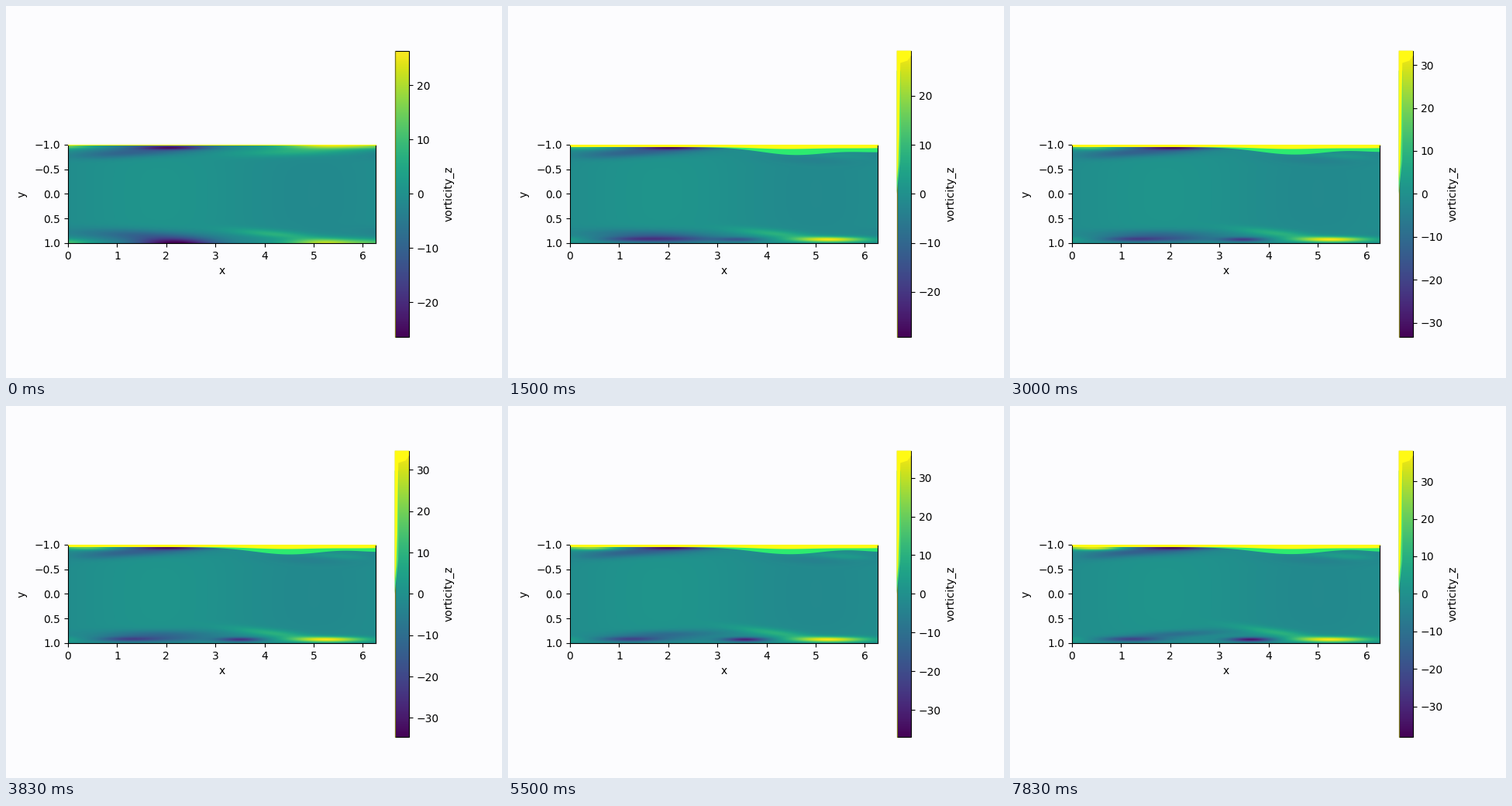
These frames come from a looping animation (640 px wide and 480 px high, 8 s). A matplotlib script:

```python
import numpy as np
import matplotlib.pyplot as plt
from matplotlib.animation import FuncAnimation
from matplotlib.patches import Polygon

FRAMES = 48
LOOP_MS = 8000
X_MAX = 2 * np.pi * 255 / 256
PX = X_MAX / 396.8          # data units per screen pixel
YELLOW = "#fffa14"
GREEN = "#2ceb70"

xs = np.linspace(0, X_MAX, 397)
X, Y = np.meshgrid(xs, np.linspace(-1, 1, 254))


def limit(i):
    """Colour limit: nearly flat at first, then growth that levels off."""
    return np.interp(i, [0, 5, 9, 14, 18, 23, 29, 38, 47],
                     [26.4, 26.8, 29.2, 31.85, 33.35, 35.0, 36.45, 37.7, 38.2])


def blob(cx, cy, sx, sy, tilt=0.0):
    """Periodic Gaussian streak, sheared by tilt."""
    dx = (X - cx + np.pi) % (2 * np.pi) - np.pi
    return np.exp(-(dx / sx) ** 2 - ((Y - cy - tilt * dx) / sy) ** 2)


def bump(cx, width):
    return np.exp(-((xs - cx) / width) ** 2)


def vorticity(i):
    """Vorticity divided by the colour limit."""
    s = i / (FRAMES - 1)
    start = np.exp(-i / 2.5)
    late = 1 - start
    grow = 1 - np.exp(-i / 18)

    w = 0.045 * np.sin(X - 0.3) * (1 - Y ** 4) - 0.01

    # lower wall
    w += start * (-0.95 * blob(2.2, 1.02, 0.8, 0.11, 0.02)
                  + 0.8 * blob(5.25, 1.0, 0.8, 0.09)
                  + 0.3 * blob(0.0, 1.0, 0.5, 0.08))
    w -= (0.36 - 0.08 * s) * blob(1.6 + 0.5 * s, 0.85 - 0.03 * s,
                                  1.35 - 0.35 * s, 0.12 - 0.05 * s,
                                  0.04 - 0.09 * s)
    w -= 0.75 * late * np.exp(-i / 16) * blob(1.9, 0.925, 1.0, 0.06)
    w -= grow * (0.55 * blob(1.2, 0.925, 0.6, 0.05)
                 + 0.95 * blob(3.4 + 0.25 * s, 0.93, 0.45, 0.045))
    w += 0.3 * blob(4.2, 0.82 - 0.03 * s, 0.85, 0.08, 0.08 + 0.06 * s)
    w += 0.95 * late * blob(5.3, 0.928, 0.75, 0.055)

    # upper wall
    w -= 0.75 * blob(2.1, -0.945, 0.75, 0.045)
    w -= 0.32 * blob(1.7, -0.88, 1.0, 0.1, -0.02)
    w -= 0.2 * blob(0.8, -0.8, 0.8, 0.09, -0.03 - 0.06 * s)
    w += 0.3 * blob(0.0, -0.97, 0.6, 0.05)
    w += 0.9 * s * blob(0.5, -0.935, 0.6, 0.045)
    w += start * (0.9 * blob(5.3, -1.0, 0.95, 0.075)
                  + 0.28 * blob(4.7, -0.87, 1.2, 0.09, -0.03))
    w += 0.17 * grow * blob(5.5, -0.77, 0.7, 0.06, 0.06)
    w -= 0.08 * late * blob(4.8, -0.7, 1.0, 0.1, 0.05)
    return np.clip(w, -1, 1)


def band(depth):
    """Outline of a strip hanging from the upper wall, depth in pixels."""
    low = np.column_stack([xs, -1 + depth * PX])
    return np.vstack([[0, -1], low, [X_MAX, -1]])


fig, ax = plt.subplots(figsize=(6.4, 4.8), dpi=100, facecolor="#fcfcfe")
im = ax.imshow(vorticity(0) * limit(0), cmap="viridis",
               extent=[0, X_MAX, 1, -1])
ax.set_xlabel("x")
ax.set_ylabel("y", labelpad=6.2)
ax.spines["top"].set_color(YELLOW)
im.set_clim(-limit(0), limit(0))
cbar = fig.colorbar(im, ax=ax, label="vorticity_z",
                    ticks=plt.MultipleLocator(10))
cax = cbar.ax

green = ax.add_patch(Polygon(band(0 * xs), color=GREEN, lw=0))
yellow = ax.add_patch(Polygon(band(0 * xs), color=YELLOW, lw=0))


def cap(points, color):
    return cax.add_patch(Polygon(points, color=color, lw=0, zorder=4,
                                 transform=cax.transAxes, clip_on=False))


caps = [
    cap([(0, 0.93), (0.25, 0.93), (0.28, 0.75), (0.24, 0.62), (0.1, 0.55),
         (0, 0.5)], "#50e070"),
    cap([(0, 1), (1, 1), (1, 0.983), (0.75, 0.965), (0.25, 0.957),
         (0.18, 0.72), (0.1, 0.6), (0, 0.54)], YELLOW),
]
cax.plot([0, 0], [0, 1], color="#7a7a18", lw=0.8, zorder=3.5,
         transform=cax.transAxes, clip_on=False)


def update(i):
    top = limit(i)
    im.set_data(vorticity(i) * top)
    im.set_clim(-top, top)

    begun = i > 0
    for patch in (green, *caps):
        patch.set_visible(begun)
    if begun:
        m = 1 - np.exp(-(i - 1) / 15)
        edge = (3 + (11 - 2 * m) * bump(4.7 - 0.25 * m, 0.95 + 0.1 * m)
                + (6.5 - m) * bump(6.3 + 0.1 * m, 1.0 - 0.4 * m))
        green.set_xy(band(edge))
        yellow.set_xy(band(3 + 2.4 * bump(4.4, 0.9) + 1.4 * bump(6.0, 0.9)))
    else:
        yellow.set_xy(band(1.3 + 0 * xs))
    return im, green, yellow


anim = FuncAnimation(fig, update, frames=FRAMES, interval=LOOP_MS / FRAMES,
                     init_func=lambda: update(0), repeat=True,
                     repeat_delay=0, blit=False)
plt.show()
```
